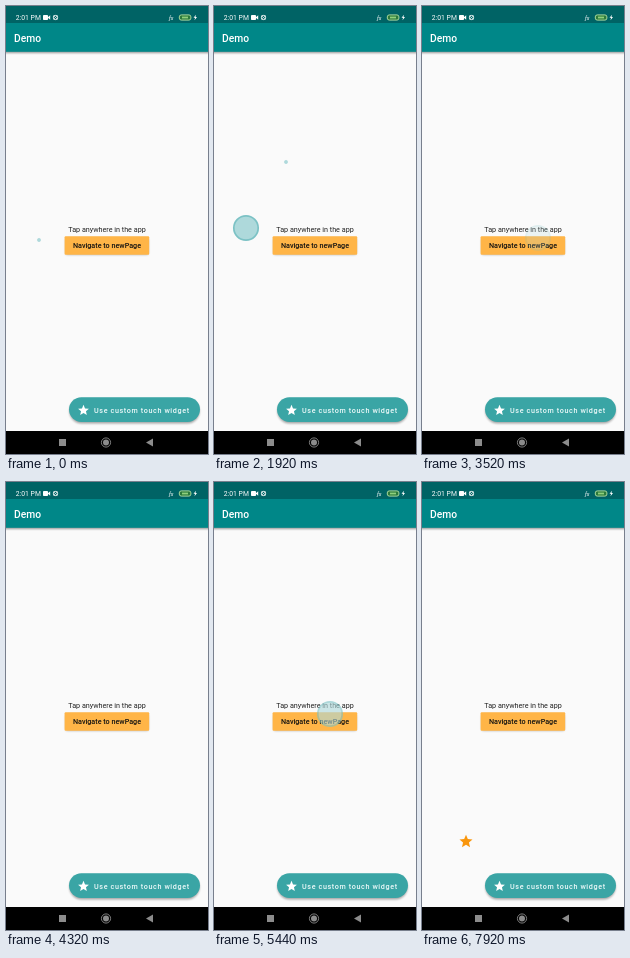
Recreate the animation shown at these times as an HTML page. Size 202 px wide and 448 px high, loop 8000 ms.

```html
<!DOCTYPE html>
<html lang="en">
<head>
<meta charset="utf-8">
<title>Touch demo</title>
<style>
html, body { margin: 0; width: 100%; height: 100%; overflow: hidden; background: #000; }
svg { display: block; width: 100%; height: 100%; }
text { font-family: Roboto, sans-serif; font-size: 7.2px; }
.medium { font-weight: 500; }
.touch { fill: #aed9db; stroke: #7cc2c5; stroke-width: 1.7; }
</style>
</head>
<body>
<svg viewBox="0 0 202 448">
  <defs>
    <path id="star" d="M0 5.27L6.18 9l-1.64-7.03L10-2.76l-7.19-.61L0-10l-2.81 6.63L-10-2.76l5.46 4.73L-6.18 9z"/>
    <filter id="soft" x="-20%" y="-60%" width="140%" height="240%"><feGaussianBlur stdDeviation="1.2"/></filter>
    <g id="base">
      <rect width="202" height="426" fill="#fafafa"/>
      <rect x="-4" y="40" width="210" height="7" fill="#000" opacity=".4" filter="url(#soft)"/>
      <rect width="202" height="45.8" fill="#008788"/>
    </g>
  </defs>

  <g id="home">
    <use href="#base"/>
    <text class="medium" x="8" y="35.7" fill="#fff" style="font-size:10.3px">Demo</text>
    <text x="101" y="225.6" text-anchor="middle" fill="#222">Tap anywhere in the app</text>
    <rect x="59.5" y="232" width="83" height="17" rx="2" opacity=".25" filter="url(#soft)"/>
    <rect x="58.6" y="230.2" width="84.6" height="18.6" rx="1" fill="#ffb547"/>
    <text class="medium" x="101" y="242.2" text-anchor="middle" fill="#111">Navigate to newPage</text>
    <rect x="63.5" y="393" width="130" height="24.5" rx="12.2" opacity=".35" filter="url(#soft)"/>
    <rect x="63" y="391.2" width="131" height="24.8" rx="12.4" fill="#3aa5a5"/>
    <rect id="ink" x="63" y="391.2" width="131" height="24.8" rx="12.4" fill="#fff" opacity="0"/>
    <use href="#star" transform="translate(77.5 404.2) scale(.54)" fill="#fff"/>
    <text class="medium" x="88" y="406.5" fill="#eefafa" letter-spacing=".62">Use custom touch widget</text>
  </g>
  <rect id="scrim" width="202" height="426" opacity="0"/>
  <g id="next" visibility="hidden"><use href="#base"/></g>

  <rect width="202" height="17" fill="#006365"/>
  <g fill="#fff">
    <text x="9.8" y="14" style="font-size:6.8px">2:01 PM</text>
    <rect x="37" y="9" width="5" height="5" rx=".8"/>
    <path d="M41.5 11.5L44.2 9.3v4.4z"/>
    <circle cx="49.5" cy="11.5" r="2.1" fill="none" stroke="#fff"/>
    <path d="M47 9.3l5 4.4M52 9.3l-5 4.4" stroke="#fff" stroke-width=".5"/>
    <text x="163" y="13.6" font-style="italic" style="font-size:5.6px">ƒx</text>
    <rect x="173.3" y="8.9" width="11.6" height="5.2" rx="2" fill="#2c7a3c" stroke="#b9e5a4" stroke-width=".9"/>
    <rect x="176" y="10.6" width="6" height="1.8" fill="#8fd07c"/>
    <path d="M190 8.8l-2.5 3h1.6l-.6 2.5 2.5-3.2h-1.5z"/>
  </g>

  <rect y="425" width="202" height="23" fill="#000"/>
  <g fill="#8c8c8c">
    <rect x="53" y="433" width="7" height="7"/>
    <circle cx="100" cy="436.5" r="3"/>
    <circle cx="100" cy="436.5" r="4.6" fill="none" stroke="#8c8c8c" stroke-width=".9"/>
    <path d="M140 436.5l7-4v8z"/>
  </g>
  <g id="touches"></g>
  <use id="mark" href="#star" fill="#f9960c" visibility="hidden"/>
</svg>
<script>
const LOOP = 8000, FADE = 80, PRESS = 260, SLIDE = 300, STAY = 320;
const $ = id => document.getElementById(id);
const clamp = v => Math.max(0, Math.min(1, v));
const span = (v, a, b) => clamp((v - a) / (b - a));
const easeOut = p => 1 - (1 - p) ** 2;

let seed = 7;
const random = () => (seed = seed * 16807 % 2147483647) / 2147483647;

const pushes = [3690, 4510, 5577, 6282];
const tap = (x, y, start) => ({ x, y, start });
const taps = [
  tap(33, 234, -248), tap(72, 156, 1672), tap(32, 222, 1780),
  tap(92, 123, 2562), tap(149, 132, 2640), tap(163, 400, 7100),
  ...pushes.map(push => tap(116, 232, push - 185))
];

// Idle tapping in the gaps, drawing in towards the upper middle
for (let start = 90; start < 3400; start += 200) {
  const reach = 1 - start / 4000;
  const x = 110 + (random() * 2 - 1) * 70 * reach;
  const y = 40 + random() * 360 * reach;
  if (taps.every(other => Math.abs(other.start - start) > PRESS)) taps.push(tap(x, y, start));
}

for (const touch of taps) {
  touch.dot = document.createElementNS("http://www.w3.org/2000/svg", "circle");
  touch.dot.setAttribute("class", "touch");
  touch.dot.setAttribute("r", 12.2);
  $("touches").appendChild(touch.dot);
}

const zoom = (el, s) => el.setAttribute("transform", `translate(101 224) scale(${s}) translate(-101 -224)`);
const show = (el, on) => el.setAttribute("visibility", on ? "visible" : "hidden");

// Touches fade in on press and shrink away on release
function drawTouch({ x, y, start, dot }, t) {
  const end = start + PRESS;
  show(dot, t > start && t < end);
  dot.setAttribute("opacity", span(t, start, start + FADE));
  dot.setAttribute("transform", `translate(${x} ${y}) scale(${1 - span(t, end - FADE, end)})`);
}

function drawPages(t) {
  const p = Math.max(...pushes.map(push => {
    const pop = push + STAY;
    return Math.min(span(t, push, push + SLIDE), 1 - span(t, pop, pop + SLIDE));
  }));
  const e = easeOut(p);
  zoom($("home"), 1 + .05 * e);
  zoom($("next"), .85 + .15 * e);
  show($("next"), p > 0);
  $("next").setAttribute("opacity", span(p, .14, .28));
  $("scrim").setAttribute("opacity", .6 * span(p, .2, .42));
}

function render(t) {
  taps.forEach(touch => drawTouch(touch, t));
  drawPages(t);
  $("ink").setAttribute("opacity", .2 * Math.min(span(t, 7110, 7200), 1 - span(t, 7280, 7440)));

  const first = t >= 7640 && t < 7800, second = t >= 7880;
  show($("mark"), first || second);
  $("mark").setAttribute("transform", `translate(${second ? "44 359.3" : "163 400"}) scale(.65)`);
}

const begin = performance.now();
function tick() {
  render((performance.now() - begin) % LOOP);
  requestAnimationFrame(tick);
}
tick();
</script>
</body>
</html>
```
